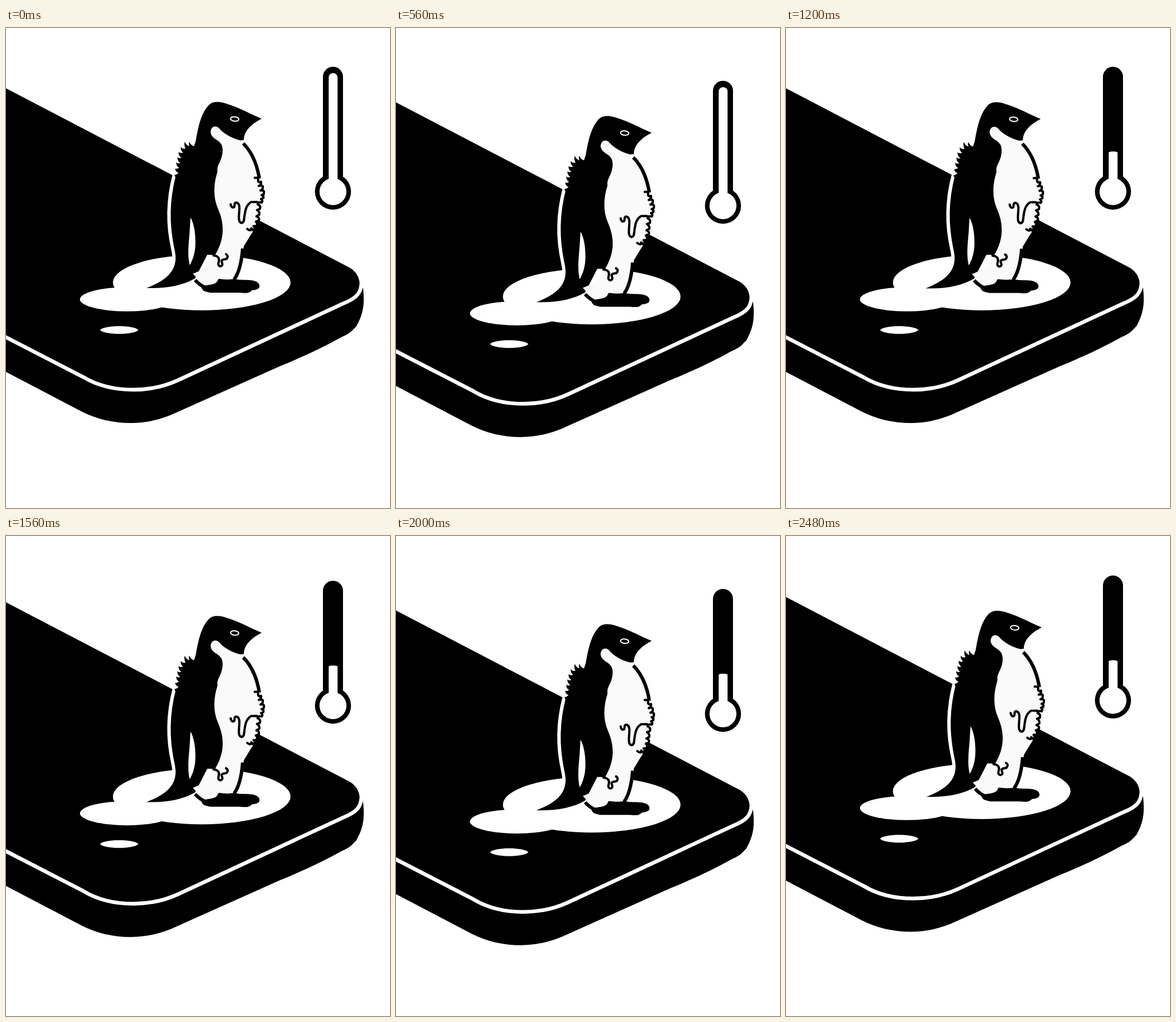
These frames come from a looping animation (670 px wide and 836 px high, 2.52 s). An HTML page:

```html
<!DOCTYPE html>
<html lang="en">
<head>
<meta charset="utf-8">
<title>Melting penguin</title>
<style>
  html, body { margin: 0; width: 100%; height: 100%; overflow: hidden; background: #fff; }
  svg { display: block; width: 100%; height: 100%; }
  .line { fill: none; stroke: #000; stroke-width: 4; stroke-linecap: round; stroke-linejoin: round; }
  .outline { fill: none; stroke: #000; stroke-width: 6; }
  .white { fill: #fff; }
  .rim { fill: none; stroke: #fff; }
</style>
</head>
<body>
<svg viewBox="0 0 670 836">
  <g id="scene">
    <g id="phone">
      <path d="M0 105 L594 414.500 C609 421 617 433 617 446 L623 453 C626 480 624 497 611 520
        C604 526 603 531 586 538 C552 557 515 574 478 589 L300 668.500 C272 682 245 688 218 688
        C187 688 157 681 132 668 L0 599Z"/>
      <path class="rim" stroke-width="6.5" d="M-3 537 L135 608 C160 623 190 630 222 630
        C250 630 277 624 300 613.500 L588 480 C611 471 619 462 620 446"/>
      <ellipse class="white" cx="341.5" cy="443.2" rx="155" ry="48.5"/>
      <ellipse class="white" cx="211" cy="472.5" rx="82" ry="21"/>
      <path class="white" d="M164 526 C171 517 224 517 231 526 C224 535 171 535 164 526Z"/>
    </g>

    <g id="penguin">
      <path class="rim" stroke-width="6" d="M293.500 256 C282 300 282 345 291 384 Q294 397 293 408"/>
      <path d="M446 158 C425 149 408 139 385 132 C371 127 360 128 354 134 C342 146 336 167 331 197
        L328 206 Q322 204 320 198 Q318 201 320 206 Q314 204 312 198 Q310 203 313 210
        Q307 211 305 207 Q304 213 309 217 Q305 219 301 216 Q301 223 306 226 Q302 228 299 225
        Q299 232 304 235 Q300 237 297 234 Q297 241 302 243 Q299 246 295 245 Q296 251 301 252
        Q298 256 294 256 Q295 261 299 262 C285 300 286 350 295 390
        C301 425 276 441 245 453 C280 454 307 449 330 436
        L400 300 L380 200 L415 195 C415 181 426 168 446 158Z"/>
      <path fill="#fafafa" d="M357 181 C358 169 369 169 374 177 C385 188 399 194 415 197
        C432 216 441 240 443 263 Q446 285 447 292 Q442 318 437 345 Q425 363 415 380
        C412 405 408 426 399 437 L373 438 Q369 449 354 450 Q338 443 326 428
        C342 423 356 411 365 395 C381 368 382 343 370 315 C361 295 362 272 369 250
        C367 237 378 232 378 212 C378 193 358 196 357 181Z"/>
      <path class="white" d="M322 330 C328 341 330.500 356 330.500 374 C330.500 391 326 404 320.500 413
        C317 400 318 381 319.500 366 C321 352 321 340 322 330Z"/>
      <path class="outline" d="M414 201 C429 216 438 238 442 262
        M413 384 C411 408 407 426 398 438 M330 439 Q338 448 348 452"/>
      <path d="M341 452 C345 445 367 451 370 438 C373 435 377 440 399 437
        C412 441 437 435 442 447 C444 455 436 456 429 457 C423 464 414 461 404 461
        L356 461 C349 459 343 459 341 452Z"/>
      <path class="line" d="M434 261 Q440 260 440 264 Q439 270 445 268
        Q446 273 441 275 Q449 273 448 278 Q448 282 444 283 Q451 282 450 287 Q450 291 446 291
        Q450 292 449 296 L445 298 Q449 301 446 304 Q440 302 439 307
        Q445 309 443 315 L438 317 Q443 320 442 325 L437 328 Q443 330 441 335
        L436 337 Q440 341 437 345 L432 345 Q436 349 432 353 L428 349 Q428 355 421 350"/>
      <path class="line" d="M392 307 Q393 314 398 312 C400 308 397 304 402 304
        C412 306 404 326 407 336 Q411 343 415 336 C417 322 417 309 428 303 M431 303 L438 303"/>
      <path class="line" d="M362 396 C371 397 373 402 371 408 Q369 414 374 415
        Q379 414 377 409 C374 402 381 404 385 402 Q389 397 384 394"/>
      <ellipse class="rim" stroke-width="2" cx="399" cy="158.500" rx="7.200" ry="3.800" transform="rotate(6 399 158.500)"/>
    </g>

    <g id="thermometer">
      <rect x="553" y="67.500" width="35" height="215" rx="17.500"/>
      <circle cx="570.500" cy="285" r="31.500"/>
      <circle class="white" cx="570.500" cy="285" r="23.500"/>
      <rect class="white" id="level" x="563" width="15.500" rx="7.750"/>
    </g>
  </g>
</svg>
<script>
const LOOP = 2520, STEP = 40, DROP = 25;
const [scene, penguin, level] = ['scene', 'penguin', 'level'].map(id => document.getElementById(id));

// Eased progress from 0 to 1 between two times
const ease = (t, from, to) => {
  const p = Math.min(1, Math.max(0, (t - from) / (to - from)));
  return p * p * (3 - 2 * p);
};

function draw(now) {
  const t = Math.floor((now % LOOP) / STEP) * STEP;
  const bob = ease(t, 17, 612) - ease(t, 612, 1198) + ease(t, 1255, 1940) - ease(t, 1960, 2565);
  const slip = Math.exp(-(((t - 1200) / 100) ** 2));
  const fall = ease(t, 610, 1205);
  const top = 78.5 + 136.5 * fall;

  scene.setAttribute('transform', `translate(0 ${DROP * bob})`);
  penguin.setAttribute('transform', `translate(${-1.7 * slip} ${0.5 * slip})`);
  level.setAttribute('y', top);
  level.setAttribute('height', 270 - top);
  level.setAttribute('ry', Math.max(2, 7.5 - 14 * fall));
  requestAnimationFrame(draw);
}
requestAnimationFrame(draw);
</script>
</body>
</html>
```
